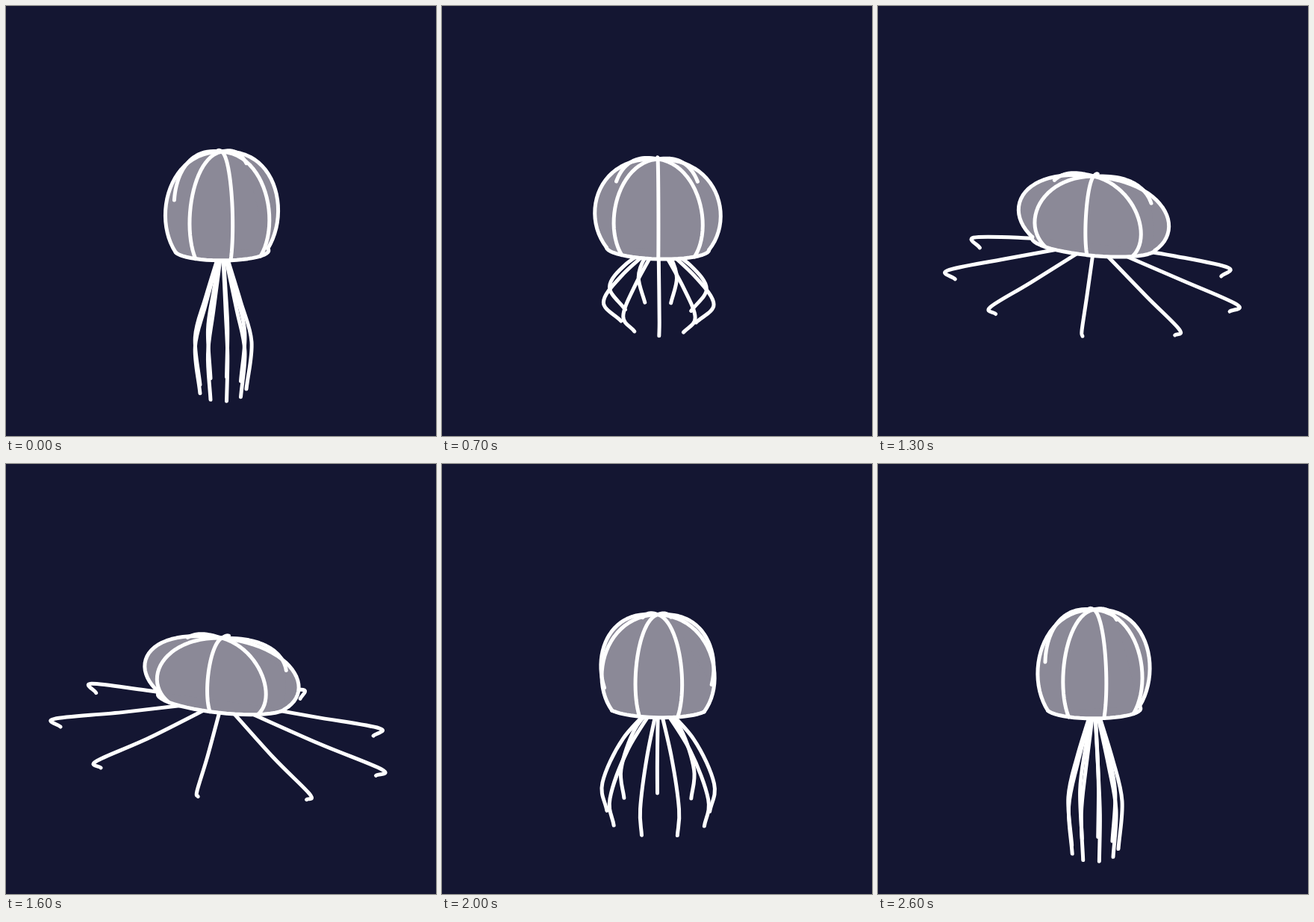
Write an HTML page with a canvas that moves like this. It is 576 by 576 pixels and loops after 2700 ms.

```html
<!DOCTYPE html>
<html lang="en">
<head>
<meta charset="utf-8">
<title>Jellyfish</title>
<style>
html, body { margin: 0; height: 100%; overflow: hidden; background: #141632; }
canvas { display: block; width: 576px; height: 576px; }
</style>
</head>
<body>
<canvas id="stage" width="576" height="576"></canvas>
<script>
const LOOP = 2700, STEP = 100, PEAK = 1600, CLOSE = 550;
const RIBS = 8, ARMS = 9, CX = 289, FOOT = 128;
const ctx = document.getElementById('stage').getContext('2d');
const rad = deg => deg * Math.PI / 180;

// Arm swing: time, then radius and height of the middle, the bend and the tip.
const swing = [
  [0, 24, 395, 39, 450, 32, 513],
  [400, 35, 372, 52, 418, 38, 468],
  [700, 50, 358, 75, 393, 51, 419],
  [1100, 98, 350, 153, 377, 140, 393],
  [1600, 130, 344, 225, 362, 217, 372],
  [2000, 48, 372, 76, 433, 70, 470],
  [2600, 24, 395, 37, 452, 32, 516]
];

// How far the bell is open: a slow rise, then a quick squeeze.
function openness(t) {
  if (t <= PEAK) return Math.sin(Math.PI / 2 * (t / PEAK) ** 1.3) ** 2;
  return Math.cos(Math.PI / 2 * Math.min(1, (t - PEAK) / CLOSE)) ** 2;
}

function swingAt(t) {
  const row = i => {
    const turns = Math.floor(i / swing.length);
    const [time, ...v] = swing[i - turns * swing.length];
    return { time: time + turns * LOOP, v };
  };
  let i = swing.length - 1;
  while (swing[i][0] > t) i--;
  const [a, b, c, d] = [-1, 0, 1, 2].map(k => row(i + k));
  const g = b.time - a.time, h = c.time - b.time, j = d.time - c.time;
  const slope = (p, q, r, g, h) => ((q - p) / g * h + (r - q) / h * g) / (g + h);
  const u = (t - b.time) / h, w = 1 - u;
  return b.v.map((p, k) => {
    const q = c.v[k];
    const m = slope(a.v[k], p, q, g, h) * h;
    const n = slope(p, q, d.v[k], h, j) * h;
    return p * w * w * (1 + 2 * u) + m * u * w * w + q * u * u * (3 - 2 * u) - n * u * u * w;
  });
}

// Smooth curve through points.
function curve(pts) {
  const last = pts.length - 1;
  const tan = pts.map((p, i) => {
    const a = pts[Math.max(0, i - 1)], b = pts[Math.min(last, i + 1)];
    const half = i > 0 && i < last ? 6 : 3;
    return [(b[0] - a[0]) / half, (b[1] - a[1]) / half];
  });
  const path = new Path2D();
  path.moveTo(...pts[0]);
  for (let i = 0; i < last; i++) {
    const p = pts[i], q = pts[i + 1], m = tan[i], n = tan[i + 1];
    path.bezierCurveTo(p[0] + m[0], p[1] + m[1], q[0] - n[0], q[1] - n[1], ...q);
  }
  return path;
}

function polyline(pts) {
  const path = new Path2D();
  pts.forEach(p => path.lineTo(...p));
  return path;
}

// Evenly spaced samples of f from a to b.
const sample = (f, a, b, n = 24) =>
  Array.from({ length: n + 1 }, (_, i) => f(a + (b - a) * i / n));

function drawArms(t, open) {
  const [midR, midY, bendR, bendY, tipR, tipY] = swingAt(t);
  const rings = [[midR, midY], [bendR, bendY], [tipR, tipY]];
  for (let k = 0; k < ARMS; k++) {
    const turn = rad(10 + 5 * open + 360 / ARMS * (k - t / LOOP));
    const pts = rings.map(([r, y]) => {
      const dx = r * Math.sin(turn);
      return [CX + 1 + dx, y + (0.33 * r + 6) * Math.cos(turn) + 0.1 * open * dx];
    });
    ctx.stroke(curve([[CX + 1, 317], ...pts]));
  }
}

function drawBell(t, open) {
  const midY = 277 + 8 * open;
  const width = 77 + 28 * open, height = 82 - 30 * open, tilt = 17 + 4 * open;
  // Point of the bell: turn around its axis, angle down from the top.
  const at = (turn, down) => {
    const s = Math.sin(rad(down));
    const dx = width * s ** 0.85 * Math.sin(rad(turn));
    const y = midY - height * Math.cos(rad(down)) + tilt * s * Math.cos(rad(turn));
    return [CX + dx, y + 0.1 * open * dx];
  };

  const turns = Array.from({ length: RIBS }, (_, k) =>
    11 + 5 * open + 360 / RIBS * (k - 3 - t / LOOP));
  const facing = turn => Math.cos(rad(turn)) + 0.25;
  // Ribs at the back show only near the top.
  const ribs = turns.map(turn =>
    sample(d => at(turn, d), 0, FOOT + 140 * Math.min(0, facing(turn))));
  const front = turns.filter(turn => facing(turn) > 0);
  const hem = polyline(sample(a => at(a, FOOT), Math.min(...front), Math.max(...front)));

  ribs.forEach((rib, i) => {
    const next = ribs[(i + 1) % RIBS];
    ctx.fill(polyline([...rib, ...[...next].reverse()]));
  });
  ctx.fill(hem);
  ribs.forEach(rib => ctx.stroke(polyline(rib)));
  ctx.stroke(hem);
}

function draw(t) {
  const open = openness(t);
  ctx.fillStyle = '#141632';
  ctx.fillRect(0, 0, 576, 576);
  ctx.strokeStyle = '#fff';
  ctx.lineWidth = 5;
  ctx.lineCap = ctx.lineJoin = 'round';
  drawArms(t, open);
  ctx.fillStyle = '#8b8997';
  drawBell(t, open);
}

let shown = -1;
const start = performance.now();
function tick() {
  const t = Math.floor((performance.now() - start) % LOOP / STEP) * STEP;
  if (t !== shown) draw(shown = t);
  requestAnimationFrame(tick);
}
tick();
</script>
</body>
</html>
```
